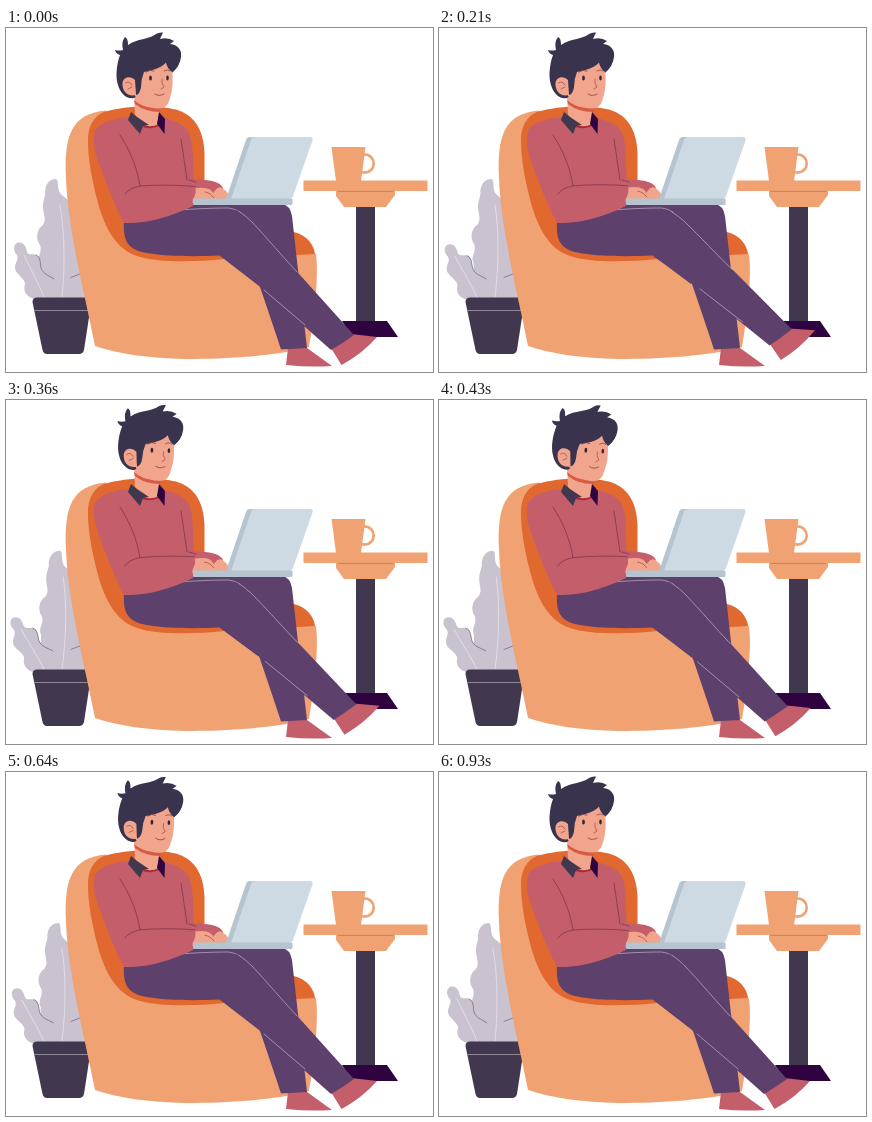
Recreate the animation shown at these times as an HTML page. Size 427x344 px, loop 1280 ms.

```html
<!DOCTYPE html>
<html lang="en">
<head>
<meta charset="utf-8">
<title>Working from the armchair</title>
<style>
html, body { margin: 0; width: 100%; height: 100%; overflow: hidden; background: #fff; }
svg { display: block; width: 100vw; height: 100vh; }
.line { fill: none; stroke-width: .8; stroke-linecap: round; stroke-linejoin: round; }
.orange { fill: #f0a272; }
.rust { fill: #e1682f; }
.ink { fill: #41374f; }
.plum { fill: #2f0340; }
.trouser { fill: #5d406b; }
.wool { fill: #c45e6a; }
.skin { fill: #f1a58c; }
.leaf { fill: #cbc2d0; }
.hair { fill: #3a334e; }
.pale { stroke: #e9e2ec; }
.seam { stroke: #b5a5bd; }
.dark { stroke: #786d84; }
.fold { stroke: #83364f; }
</style>
</head>
<body>
<svg viewBox="0 0 427 344" preserveAspectRatio="none">
  <!-- plant -->
  <g id="tall">
    <path class="leaf" d="M40 272C36 258 33 248 34 236C30 229 37 224 34 217C29 210 31 201 37 197C41 191 37 187 37 178C37 172 40 168 39 163C40 155 44 151 50 151C53 152 51 160 54 165C57 169 61 169 64 176L88 240L84 272Z"/>
    <path class="line pale" d="M54 177C59 205 59 240 56 269"/>
  </g>
  <path class="line dark" d="M65 249.500L75 245.500"/>
  <g id="small">
    <path class="leaf" d="M28 271C19 268 17 262 19 256C19 250 9 246 9 240C9 234 13 232 11 227C7 223 7 217 11 215C17 213 20 218 21 224C23 228 27 225 31 227C35 229 34 235 35 240C37 246 45 245 48 250C52 256 50 265 51 271Z"/>
    <path class="line pale" d="M18 227C24 240 32 254 38 269"/>
    <path class="line dark" d="M30 227C35 229 34 235 35 240C37 246 42 247 48 251"/>
  </g>
  <path class="ink" d="M26.500 274Q26.500 269.500 31 269.500H86L78 322Q77 326 73 326H41Q37.500 326 36.500 322Z"/>
  <path class="line" stroke="#a49bab" d="M29 282.500H83"/>

  <!-- table and cup -->
  <path class="plum" d="M336 293H381L392 309H346Z"/>
  <path class="ink" d="M350 178H369V293H350Z"/>
  <path class="orange" d="M330 162H389V167L380 179H338L330 168Z"/>
  <path class="orange" d="M297.500 152.500H421.500V163H297.500Z"/>
  <path class="line" stroke="#c9773f" d="M332 163.400H387"/>
  <circle cx="358.500" cy="135.500" r="9.200" fill="none" stroke="#f0a272" stroke-width="2.700"/>
  <path class="orange" d="M325.500 119H359.500L355 153H330Z"/>

  <!-- armchair -->
  <path class="orange" d="M89 318C81 275 62 205 60 150C58 106 66 86 100 82.500L200 190L290 226H310C313 250 308 290 303 319C270 328 222 331 180 331C142 330 112 326 89 318Z"/>
  <path class="rust" d="M98 84C120 77 152 77 170 81.500C189 87 198 103 198.500 125V185L288 204C301 207 308 217 309 226L290 227L218 231C190 234 150 235 131 228C110 221 99 200 92 175C86 152 82 132 82 112C82 98 88 88 98 84Z"/>

  <!-- far leg -->
  <path class="wool" d="M282 320H301L326 338Q303 339.500 280 337Z"/>
  <path class="trouser" d="M180 176H276Q284 177 286 188Q289 215 292 242L301 320L275 321.500Q268 300 253 256L200 215Z"/>

  <!-- near leg -->
  <path class="trouser" d="M118 194L190 176H222Q236 183 248 196L252 256L214 227.500C182 229 153 228 136 224C121 220 117 211 118 194Z"/>
  <path class="line seam" d="M168 182.500C190 180.500 210 180 223 180Q228 180.500 234 184"/>
  <g id="shin">
    <path class="wool" d="M345 306L371 309Q356 326 335.500 337L325 320Z"/>
    <path class="trouser" d="M213 227L230 182Q239 187 246 194C262 211 280 233 294 247L348 307Q337 315 325 322L253 258Z"/>
    <path class="line seam" d="M234 184Q240 188 246 194C262 211 276 228 291 244M258 262L299 297"/>
  </g>

  <!-- far arm -->
  <path class="wool" d="M178 151Q198 151 206 153Q215 155 217 160L210 172H180Z"/>
  <path class="skin" d="M205 172Q208 160 214 159Q221 162 223 168L221 172Z"/>

  <!-- torso -->
  <path class="wool" d="M125 89C108 90 94 94 89 103C86 112 89 126 94 138C101 158 109 178 118 195Q150 196 187 178L190 168Q187 150 187 135Q187 112 182 103Q176 94 158 90Z"/>
  <path class="line fold" d="M114 107C123 121 131 138 134 158M175 111Q178 131 181 152M183 152L190 154"/>
  <path class="skin" d="M128 66H155L153 97Q147 102 138 97L129 87Z"/>
  <path fill="#d85a45" d="M128 72Q139 82 156 79L154 84Q139 84 129 76Z"/>
  <path class="line" stroke="#a92c35" style="stroke-width:2" d="M137 98Q146 101 153 97"/>
  <path class="ink" d="M125 84L122 92L134 106L137 98L143 97L131 89Z"/>
  <path class="plum" d="M153 84L159 91L158.500 106L151 96Z"/>

  <!-- head -->
  <g id="head">
    <path class="hair" d="M128 70C121 72 114 65 112 57C109 48 111 35 114 27Q110 26 109 22Q113 23 117 22Q115 14 119 9Q122 10 122 17C132 10 142 12 150 6Q153 4 157 4.500L154 11Q162 9 168 13L164 16C173 17 176 23 175 29Q174 38 166 45Z"/>
    <path class="skin" d="M129 55L136 40L160 33L166 42Q168 58 164 70C162 79 157 81 151 80.500C142 80 134 75 129 68Z"/>
    <path class="hair" d="M127 48L134 36L160 28L174 32Q172 40 166 44Q161 40 160 34.500C154 41 146 42 138 44Q135 51 135 59Q134 66 130 67Q127 60 127 48Z"/>
    <path class="skin" d="M129 52C124 47 117 49 116.500 55C116 63 121 69 130 67Z"/>
    <path class="line" stroke="#a8545a" d="M119.500 55Q123 52 126 57M122 61L126 59"/>
    <ellipse cx="144.500" cy="50" rx="1.400" ry="2.500" fill="#30263f"/>
    <ellipse cx="161.500" cy="50" rx="1.300" ry="2.400" fill="#30263f"/>
    <path class="line" stroke="#7a4550" d="M140 44Q144 41 148 43M158 43Q162 41 164 43"/>
    <path class="line" stroke="#b54f4b" d="M156 51Q155 55 158 59L155 61"/>
    <path class="line" stroke="#8c3d44" d="M149 66Q153 69 158 66"/>
  </g>

  <!-- near arm -->
  <g id="arm">
    <path class="skin" d="M186 161Q198 158.500 204 161.500Q209 165 212 175H186Z"/>
    <path class="line" stroke="#b54f4b" d="M199 164Q205 165 208 170"/>
    <path class="wool" d="M112 178Q117 163 134 158.500Q160 156 189 158.500Q191 165 187 171L186 178Q153 194 119 195Z"/>
    <path class="line fold" d="M119 166Q123 160 134 158Q160 156 189 158.500"/>
  </g>

  <!-- laptop -->
  <path fill="#b5c4ce" d="M220 171L240 112Q241 109 244 109H250L228 171Z"/>
  <path fill="#cddae4" d="M225 171L245 112Q246 109 249 109H304Q307.500 109 306.500 112.500L287 168Q286 171 283 171Z"/>
  <rect x="187" y="170.500" width="99.500" height="6.500" rx="1" fill="#b5c4ce"/>
</svg>
<script>
const LOOP = 1280;
const STEPS = [0, 70, 140, 210, 290, 360, 430, 500, 570, 640, 710, 790, 860, 930];

// Eased value between [time, value] keys, held outside them.
function ease(t, keys) {
  if (t <= keys[0][0]) return keys[0][1];
  for (let i = 1; i < keys.length; i++) {
    const [a, from] = keys[i - 1], [b, to] = keys[i];
    if (t <= b) return from + (to - from) * (1 - Math.cos(Math.PI * (t - a) / (b - a))) / 2;
  }
  return keys[keys.length - 1][1];
}

const sway = [[0, 0], [360, 1], [430, 1], [930, 0]];
const parts = [
  { id: "head", x: 140, y: 95, turn: 3.5, keys: [[210, 0], [500, 1], [790, 0]] },
  { id: "shin", x: 235, y: 205, turn: -2.8, keys: [[0, 0], [210, 1], [500, 0]] },
  { id: "tall", x: 56, y: 270, turn: 2, keys: sway },
  { id: "small", x: 45, y: 267, turn: -4.5, keys: sway },
  { id: "arm", x: 122, y: 182, turn: -1.5, keys: [[0, 0], [210, .4], [360, 1], [500, 1], [640, .4], [790, 1], [930, 0]] }
];
for (const p of parts) p.node = document.getElementById(p.id);

function draw(time) {
  const now = time % LOOP;
  const t = STEPS.filter(s => s <= now).pop();
  for (const p of parts) {
    const angle = p.turn * ease(t, p.keys);
    p.node.setAttribute("transform", `rotate(${angle.toFixed(3)} ${p.x} ${p.y})`);
  }
}

let start;
function tick(time) {
  start ??= time;
  draw(Math.max(0, time - start));
  requestAnimationFrame(tick);
}
draw(0);
requestAnimationFrame(tick);
</script>
</body>
</html>
```
